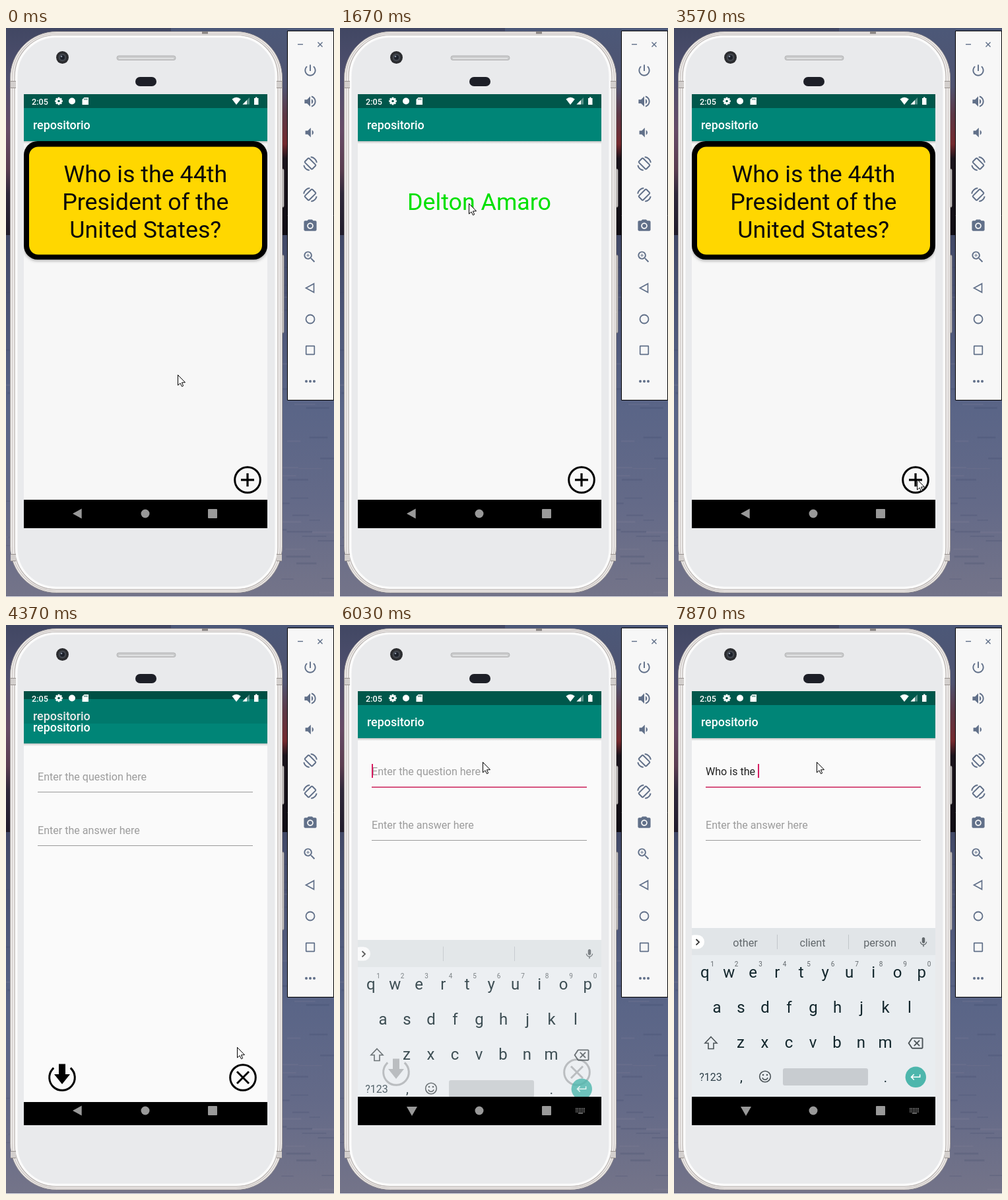
Recreate the animation shown at these times as an HTML page with a canvas. Size 497 by 860 pixels, loop 7.99 s.

```html
<!DOCTYPE html>
<html lang="en">
<head>
<meta charset="utf-8">
<title>Flashcard app</title>
<style>
html, body { margin: 0; width: 100%; height: 100%; overflow: hidden; background: #565d7c; }
canvas { display: block; width: 497px; height: 860px; }
</style>
</head>
<body>
<canvas id="stage" width="497" height="860"></canvas>
<script>
const W = 497, H = 860, LOOP = 7990;
const stage = document.getElementById('stage');
let c = stage.getContext('2d');

const SLATE = '#617089', NAV = '#999', TITLE = 'repositorio', ANSWER = 'Delton Amaro';
const QUESTION = ['Who is the 44th', 'President of the', 'United States?'];

const ICONS = {
  power: 'M13 3h-2v10h2V3zm4.83 2.17l-1.42 1.42C17.99 7.86 19 9.81 19 12c0 3.87-3.13 7-7 7s-7-3.13-7-7c0-2.19 1.01-4.14 2.58-5.42L6.17 5.17C4.23 6.82 3 9.26 3 12c0 4.97 4.03 9 9 9s9-4.03 9-9c0-2.74-1.23-5.18-3.17-6.83z',
  loud: 'M3 9v6h4l5 5V4L7 9H3zm13.5 3c0-1.77-1.02-3.29-2.5-4.03v8.05c1.48-.73 2.5-2.25 2.5-4.02zM14 3.23v2.06c2.89.86 5 3.54 5 6.71s-2.11 5.85-5 6.71v2.06c4.01-.91 7-4.49 7-8.77s-2.99-7.86-7-8.77z',
  quiet: 'M18.5 12c0-1.77-1.02-3.29-2.5-4.03v8.05c1.48-.73 2.5-2.25 2.5-4.02zM5 9v6h4l5 5V4L9 9H5z',
  camera: 'M9 2L7.17 4H4c-1.1 0-2 .9-2 2v12c0 1.1.9 2 2 2h16c1.1 0 2-.9 2-2V6c0-1.1-.9-2-2-2h-3.17L15 2H9zm3 15c-2.76 0-5-2.24-5-5s2.24-5 5-5 5 2.24 5 5-2.24 5-5 5z',
  zoom: 'M15.5 14h-.79l-.28-.27C15.41 12.59 16 11.11 16 9.5 16 5.91 13.09 3 9.5 3S3 5.91 3 9.5 5.91 16 9.5 16c1.61 0 3.09-.59 4.23-1.57l.27.28v.79l5 4.99L20.49 19l-4.99-5zm-6 0C7.01 14 5 11.99 5 9.5S7.01 5 9.5 5 14 7.01 14 9.5 11.99 14 9.5 14zM12 10h-2v2H9v-2H7V9h2V7h1v2h2v1z',
  erase: 'M22 3H7c-.69 0-1.23.35-1.59.88L0 12l5.41 8.11c.36.53.9.89 1.59.89h15c1.1 0 2-.9 2-2V5c0-1.1-.9-2-2-2zm0 16H7.07L2.4 12l4.66-7H22v14zm-11.59-2L14 13.41 17.59 17 19 15.59 15.41 12 19 8.41 17.59 7 14 10.59 10.41 7 9 8.41 12.59 12 9 15.59z',
  mic: 'M12 14c1.66 0 2.99-1.34 2.99-3L15 5c0-1.66-1.34-3-3-3S9 3.34 9 5v6c0 1.66 1.34 3 3 3zm5.3-3c0 3-2.54 5.1-5.3 5.1S6.7 14 6.7 11H5c0 3.41 2.72 6.23 6 6.72V21h2v-3.28c3.28-.48 6-3.3 6-6.72h-1.7z',
  enter: 'M19 7v4H5.83l3.58-3.59L8 6l-6 6 6 6 1.41-1.41L5.83 13H21V7z'
};

// Each step: start time, then its values.
const POINTER = [
  [0, 260, 524], [970, 235, 457], [1110, 216, 349], [1250, 204, 288], [1390, 195, 265],
  [2880, 200, 288], [3018, 230, 380], [3156, 305, 569], [3294, 323, 657], [3432, 350, 687], [3570, 368, 682],
  [4250, 364, 668], [4370, 350, 638], [4490, 328, 560], [4630, 288, 425], [4770, 242, 282],
  [4910, 218, 189], [5030, 217, 201], [5180, 216, 207]
];
// New page offset, its top clip, old page shift, old page dimming.
const OPENING = [[4250, 26, 0.78, -1, 0.02], [4370, 8, 0.0625, -9, 0.09], [4490, 2, 0.008, -12, 0.1], [4630, 0, 0, -13, 0.1]];
// Keyboard drop and opacity.
const RISING = [[5760, 66, 0.35], [5900, 18, 0.8], [6040, 4, 1], [6180, 0, 1]];
const TYPING = [
  [0, '', []],
  [6450, 'Wh', ['Wh', 'What', 'Who']],
  [6600, 'Who', ['Who', 'Whole', "Who's"]],
  [6750, 'Who ', ['is', 'are', 'was']],
  [6930, 'Who i', ['i', 'is', 'in']],
  [7100, 'Who is', ['is', 'isn\'t', 'issue']],
  [7280, 'Who is ', ['the', 'this', 'your']],
  [7450, 'Who is t', ['t', 'the', 'to']],
  [7570, 'Who is th', ['th', 'the', 'this']],
  [7720, 'Who is the', ['the', 'then', 'there']],
  [7870, 'Who is the ', ['other', 'client', 'person']]
];
const stepAt = (list, t) => list.reduce((best, s) => s[0] <= t ? s : best, list[0]);

function rect(x, y, w, h, fill) { c.fillStyle = fill; c.fillRect(x, y, w, h); }
function round(x, y, w, h, r, fill, stroke, lw = 1) {
  c.beginPath(); c.roundRect(x, y, w, h, r);
  if (fill) { c.fillStyle = fill; c.fill(); }
  if (stroke) { c.strokeStyle = stroke; c.lineWidth = lw; c.stroke(); }
}
function disc(x, y, r, fill, stroke, lw) { round(x - r, y - r, 2 * r, 2 * r, r, fill, stroke, lw); }
function poly(points, fill, stroke, lw = 1) {
  c.beginPath();
  for (let i = 0; i < points.length; i += 2) c.lineTo(points[i], points[i + 1]);
  if (fill) { c.closePath(); c.fillStyle = fill; c.fill(); }
  if (stroke) { c.strokeStyle = stroke; c.lineWidth = lw; c.stroke(); }
}
function text(s, x, y, size, color, align = 'left', weight = 400) {
  c.font = `${weight} ${size}px Roboto, sans-serif`;
  c.textAlign = align; c.fillStyle = color;
  c.fillText(s, x, y);
}
function icon(name, x, y, size, color) {
  c.save();
  c.translate(x - size / 2, y - size / 2); c.scale(size / 24, size / 24);
  c.fillStyle = color; c.fill(new Path2D(ICONS[name]));
  c.restore();
}
function fade(x, y, w, h, stops, vertical = true) {
  const g = vertical ? c.createLinearGradient(0, y, 0, y + h) : c.createLinearGradient(x, 0, x + w, 0);
  stops.forEach(([at, color]) => g.addColorStop(at, color));
  rect(x, y, w, h, g);
}

function wallpaper() {
  fade(0, 0, 250, 313, [[0, '#414763'], [0.25, '#50506f'], [0.5, '#674b66'], [0.68, '#5b3d50'], [0.8, '#30283a'], [1, '#211c2b']]);
  fade(250, 0, 247, 313, [[0, '#4c5878'], [0.28, '#4f5370'], [0.42, '#5d3745'], [0.56, '#74292e'], [0.63, '#1b141c'], [1, '#100d14']]);
  fade(0, 313, W, 547, [[0, '#414866'], [0.2, '#4c5475'], [0.48, '#5a6587'], [0.75, '#646a88'], [1, '#747489']]);
  let seed = 7;
  const rnd = () => (seed = seed * 16807 % 2147483647) / 2147483647;
  for (let i = 0; i < 260; i++) {
    const tone = rnd() < 0.5 ? '140,134,156' : '54,64,98';
    rect(rnd() * W - 15, 330 + rnd() * 525, 10 + rnd() * 30, 1 + rnd() * 2, `rgba(${tone},.18)`);
  }
  rect(0, 859, W, 1, '#e4e4ea');
}

function phone() {
  round(416, 213, 5, 58, 2, '#d8d4d2', '#8d8989');
  round(416, 343, 5, 118, 2, '#d8d4d2', '#8d8989');
  round(6.5, 5.5, 412, 848, 70, '#f3f1f0', '#a19b99');
  round(9.5, 8, 406, 843, 67, null, '#cfc9c6', 1.5);
  round(13, 10.5, 399, 838, 63, '#f7f7f7', '#b9b3b0', 1.2);
  round(16, 13, 393, 833, 60, '#e9eaec', '#fbfbfb', 3);
  for (const y of [80, 795]) for (const x of [7, 410]) {
    rect(x, y, 8, 10, '#d3cfcd');
    rect(x, y, 8, 1, '#98928f'); rect(x, y + 10, 8, 1, '#98928f');
  }
  rect(297, 5, 9, 4, '#8c8785');
  disc(85.5, 44.5, 9.5, '#2b2c2f');
  disc(85.5, 44.5, 6, '#42464d');
  disc(85.5, 44.5, 3.5, '#1c2029');
  disc(84, 43, 1.3, '#8b95a5');
  round(168, 42, 89, 6.5, 3, '#c9cacb', '#b5b5b6');
  rect(171, 45, 83, 2, '#dedfe0');
  round(196, 74, 32, 14, 7, '#1d1f27');
}

function rotateIcon(y, dir) {
  c.save();
  c.translate(461, y); c.scale(dir, 1);
  c.save(); c.rotate(-Math.PI / 4);
  round(-4.5, -8, 9, 16, 1.5, null, SLATE, 2);
  c.restore();
  c.strokeStyle = SLATE; c.lineWidth = 2;
  c.beginPath(); c.arc(0, 0, 10, -1.5, -0.15); c.stroke();
  c.beginPath(); c.arc(0, 0, 10, 1.7, 2.9); c.stroke();
  c.restore();
}

function panel() {
  round(426.5, 4.5, 70, 558, 0, '#f7f7f7', '#000');
  rect(442, 24, 8, 1.4, SLATE);
  poly([472.5, 21.5, 479.5, 28.5], null, SLATE, 1.4);
  poly([479.5, 21.5, 472.5, 28.5], null, SLATE, 1.4);
  icon('power', 461, 64, 23, SLATE);
  icon('loud', 461, 111, 23, SLATE);
  icon('quiet', 460, 158, 22, SLATE);
  rotateIcon(205, 1);
  rotateIcon(252, -1);
  icon('camera', 461, 299, 23, SLATE);
  disc(461, 299, 3, SLATE);
  icon('zoom', 460, 346, 23, SLATE);
  poly([454.5, 393, 466.5, 386.5, 466.5, 399.5, 454.5, 393, 466.5, 386.5], null, SLATE, 1.7);
  disc(461, 440, 6.5, null, SLATE, 1.8);
  round(454.7, 480.7, 12.6, 12.6, 0.5, null, SLATE, 1.7);
  for (const x of [455, 461, 467]) disc(x, 534, 2, SLATE);
}

function statusIcons() {
  text('2:05', 39, 115.5, 12.6, '#fff', 'left', 500);
  c.save(); c.translate(80, 110.5);
  for (let i = 0; i < 8; i++) { c.rotate(Math.PI / 4); rect(-1.4, -5.8, 2.8, 4, '#fff'); }
  c.restore();
  disc(80, 110.5, 3.2, null, '#fff', 2.2);
  disc(100, 110.5, 5, '#fff');
  poly([118.5, 105, 125, 105, 125, 116, 115.5, 116, 115.5, 108], '#fff');
  for (const x of [118.3, 120.3, 122.3]) rect(x, 106.5, 1, 2.2, '#00574b');
  c.beginPath(); c.moveTo(349, 116); c.lineTo(342.5, 107.5);
  c.quadraticCurveTo(349, 102, 355.8, 107.5); c.fillStyle = '#fff'; c.fill();
  poly([369, 105, 369, 115.5, 358.5, 115.5], 'rgba(255,255,255,.35)');
  poly([365, 109, 365, 115.5, 358.5, 115.5], '#fff');
  rect(376, 106, 6.5, 10, '#fff'); rect(378, 104.5, 2.5, 2, '#fff');
}

function navIcons(typing) {
  if (typing) {
    poly([101, 728, 117, 728, 109, 742], NAV);
    for (let y = 730; y < 736; y += 2.5) for (let x = 357; x < 372; x += 2.5) rect(x, y, 1.5, 1.5, '#8a8a8a');
    rect(361, 737.3, 7, 1.4, '#8a8a8a');
  } else poly([101, 734, 114.7, 726.5, 114.7, 741.5], NAV);
  disc(211, 734, 6.5, NAV);
  round(306, 727, 14, 14, 1, NAV);
}

// Window frame shared by both pages.
function page(bg) {
  rect(27, 100, 369, 656, bg);
  rect(27, 100, 369, 21, '#00574b');
  fade(27, 171, 369, 4, [[0, 'rgba(0,0,0,.22)'], [1, 'rgba(0,0,0,0)']]);
  rect(27, 121, 369, 50, '#008577');
  text(TITLE, 41, 153, 17.9, '#fff', 'left', 500);
  rect(27, 713, 369, 43, '#000');
}

function cardPage(answered) {
  page(answered ? '#f8f8f8' : '#f7f7f7');
  if (answered) text(ANSWER, 211, 275, 35.8, '#00e000', 'center');
  else {
    c.save();
    c.shadowColor = 'rgba(0,0,0,.3)'; c.shadowBlur = 4; c.shadowOffsetY = 2;
    round(27, 171, 369, 179, 21, '#000');
    c.restore();
    round(35, 179.5, 353, 163, 14, '#ffd700');
    QUESTION.forEach((s, i) => text(s, 211.3, 233 + 42 * i, 35.8, '#0a0a0a', 'center'));
  }
  disc(366, 683, 19.3, null, '#000', 3);
  rect(356, 681.4, 20, 3.2, '#000');
  rect(364.4, 673, 3.2, 20, '#000');
}

function formPage(focused, typed) {
  page('#fafafa');
  if (typed) {
    text(typed, 48, 227, 16.07, '#212121');
    const word = typed.lastIndexOf(' ') + 1;
    const from = c.measureText(typed.slice(0, word)).width;
    rect(48 + from, 229, c.measureText(typed).width - from, 1, '#333');
  } else text('Enter the question here', 48, 227, 16.07, '#9c9c9c');
  if (focused) {
    const end = typed ? c.measureText(typed).width : 0;
    rect(48 + end, 210, 2, 21, '#d81b60');
    rect(48, 244.3, 326, 1.7, '#d03a6c');
  } else rect(48, 244, 326, 1, '#9a9a9a');
  text('Enter the answer here', 48, 308, 16.07, '#9c9c9c');
  rect(48, 325, 326, 1, '#9a9a9a');

  c.strokeStyle = '#000'; c.lineWidth = 3;
  c.beginPath(); c.arc(85, 676, 19.3, -0.85, Math.PI + 0.85); c.stroke();
  poly([80, 655.5, 90, 655.5, 90, 671, 97, 671, 85, 686, 73, 671, 80, 671], '#000');
  disc(359, 676, 19.3, null, '#000', 3);
  poly([350, 667, 368, 685], null, '#000', 3);
  poly([368, 667, 350, 685], null, '#000', 3);
}

function keyboard(words) {
  const ink = '#12262c', gray = '#62686c';
  rect(27, 458, 369, 255, '#e9edf0');
  rect(27, 458, 369, 41, '#e1e5e8');
  round(20, 468.5, 26, 21, 10.5, '#fff');
  rect(15, 467, 12, 24, '#e9eaec');
  poly([33.5, 475, 38, 479.3, 33.5, 483.6], null, '#333', 1.8);
  for (const x of [156, 264]) rect(x, 468, 1, 22, '#c1c6ca');
  words.forEach((s, i) => text(s, 108 + 102 * i, 485.5, 16.2, gray, 'center'));
  icon('mic', 378, 479.5, 18, gray);
  const row = (keys, x, y) => [...keys].forEach((k, i) => text(k, x + 36.5 * i, y, 24, ink, 'center'));
  row('qwertyuiop', 46.7, 533);
  row('asdfghjkl', 65, 585.5);
  row('zxcvbnm', 101, 638.5);
  [...'1234567890'].forEach((k, i) => text(k, 58 + 36.5 * i, 515.5, 10, gray, 'center'));
  poly([56, 622.5, 65, 632, 60, 632, 60, 640.5, 52, 640.5, 52, 632, 47, 632, 56, 622.5, 57, 623.5], null, '#4c5458', 1.6);
  icon('erase', 366, 632, 23, '#4c5458');
  text('?123', 55.5, 688.5, 16, '#30414a', 'center');
  text(',', 102, 690, 20, ink, 'center');
  text('.', 320.5, 691, 20, ink, 'center');
  disc(138, 682.5, 8.3, null, '#4c5458', 1.6);
  disc(135, 680, 1.3, '#4c5458'); disc(141, 680, 1.3, '#4c5458');
  c.beginPath(); c.arc(138, 683, 4.3, 0.3, Math.PI - 0.3); c.stroke();
  round(165, 670, 129, 26, 3, '#c8ccd0');
  disc(366.3, 683.3, 15.7, '#4db6ac');
  icon('enter', 366.3, 683.3, 19, '#fff');
}

function pointer(x, y) {
  c.save(); c.translate(x + 0.5, y + 0.5);
  c.lineJoin = 'miter';
  poly([0, 0, 0, 15.5, 3.5, 12.3, 6, 17.3, 8.2, 16.3, 5.9, 11.4, 11, 11.2, 0, 0, 0, 2], '#fff', '#000', 1);
  c.restore();
}

const backdrop = document.createElement('canvas');
backdrop.width = W; backdrop.height = H;
c = backdrop.getContext('2d');
wallpaper(); phone(); panel();
c = stage.getContext('2d');

function screen(t) {
  rect(27, 100, 369, 656, '#000');
  const typing = t >= 5760;
  if (t < 4250) cardPage(t >= 1670 && t < 2410);
  else {
    const [, drop, clip, shift, dim] = stepAt(OPENING, t);
    if (drop) {
      c.save(); c.translate(0, shift); cardPage(false); c.restore();
      rect(27, 100, 369, 656, `rgba(0,0,0,${dim})`);
    }
    c.save();
    c.translate(0, drop);
    c.beginPath(); c.rect(27, 100 + 656 * clip, 369, 656); c.clip();
    const [, typed, words] = stepAt(TYPING, t);
    formPage(t >= 5330, typed);
    if (typing) {
      const [, low, alpha] = stepAt(RISING, t);
      c.save();
      c.globalAlpha = alpha; c.translate(0, low);
      keyboard(words);
      c.restore();
      rect(27, 713, 369, 43, '#000');
    }
    c.restore();
  }
  statusIcons();
  navIcons(typing);
}

function draw(t) {
  c.drawImage(backdrop, 0, 0);
  c.save();
  c.beginPath(); c.rect(27, 100, 369, 656); c.clip();
  screen(t);
  c.restore();
  const [, x, y] = stepAt(POINTER, t);
  pointer(x, y);
}

const start = performance.now();
function tick() {
  draw((performance.now() - start) % LOOP);
  requestAnimationFrame(tick);
}
tick();
</script>
</body>
</html>
```
